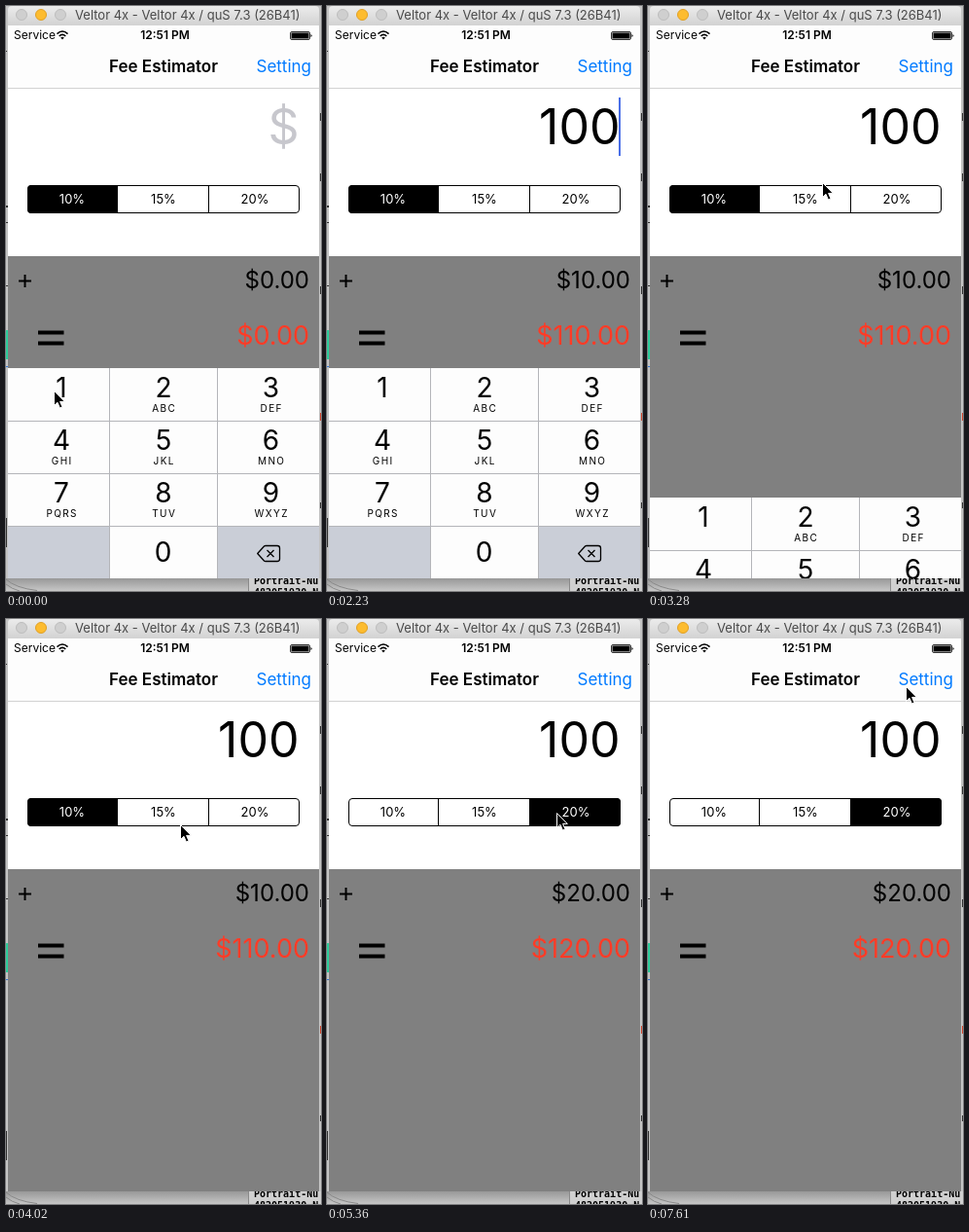
An HTML page that plays this animation: 324 px wide and 601 px high, repeating every 8 s.

```html
<!DOCTYPE html>
<html lang="en">
<head>
<meta charset="utf-8">
<style>
  html, body { margin: 0; width: 100%; height: 100%; overflow: hidden; background: #ccc; }
  svg { display: block; width: 324px; height: 601px; font-family: Inter, Roboto, sans-serif; }
  .end { text-anchor: end; }
  .mid { text-anchor: middle; }
  .mono { font: bold 10px "DejaVu Sans Mono", monospace; }
  .line { fill: none; stroke: #b4b5b9; }
</style>
</head>
<body>
<svg viewBox="0 0 324 601">
  <defs>
    <linearGradient id="bar" x2="0" y2="1">
      <stop stop-color="#ececec"/><stop offset="1" stop-color="#d2d2d2"/>
    </linearGradient>
    <linearGradient id="shade" x2="0" y2="1">
      <stop stop-color="#989898"/><stop offset="1" stop-color="#c6c6c6"/>
    </linearGradient>
    <clipPath id="screen"><path d="M2 20H322V588H2z"/></clipPath>
  </defs>

  <!-- desktop behind the window -->
  <path fill="#c4c4c4" d="M0 0H324V601H0z"/>
  <path fill="url(#shade)" d="M0 588H324V601H0z"/>
  <path fill="#d0d0d0" d="M250 588H324V601H250z"/>
  <path fill="none" stroke="#8a8a8a" d="M249.5 588V601M0 589Q10 598 32 600.5M0 594Q6 599 14 601"/>
  <path fill="#2ecc9b" d="M0 333H2V363H0z"/>
  <path fill="#333" d="M0 46H1V47H0zM0 205H2V207H0zM0 222H2V223H0zM0 287H2V288H0zM0 526H1V556H0zM323 110H324V118H323zM323 172H324V180H323zM323 288H324V296H323zM323 510H324V516H323z"/>
  <path fill="#3478d8" d="M0 370H2V371H0z"/>
  <path fill="#d0442c" d="M323 418H324V426H323z"/>
  <g class="mono">
    <text x="255" y="594">Portrait-Nu</text>
    <text x="255" y="606">482051930-N</text>
  </g>

  <!-- title bar -->
  <path fill="url(#bar)" d="M2 20V4Q2 0 6 0H318Q322 0 322 4V20z"/>
  <g fill="#cfcfcf" stroke="#bdbdbd">
    <circle cx="16" cy="9" r="5.5"/>
    <circle cx="36" cy="9" r="5.5" fill="#fdbc2f" stroke="#e0a025"/>
    <circle cx="56" cy="9" r="5.5"/>
  </g>
  <text x="71" y="14" font-size="13" fill="#4a4a4a">Veltor 4x - Veltor 4x / quS 7.3 (26B41)</text>

  <!-- app -->
  <path fill="#fff" d="M2 20H322V588H2z"/>
  <path fill="#fdfdfd" d="M2 20H322V84H2z"/>
  <path fill="#d2d2d2" d="M2 84H322V85H2z"/>
  <text x="8" y="34" font-size="12">Service</text>
  <path fill="none" stroke="#000" stroke-width="1.6" d="M52.5 28.6Q58 23.4 63.5 28.6M54.7 31Q58 27.8 61.3 31"/>
  <path d="M56.2 32.4Q58 31 59.8 32.4L58 34.4z"/>
  <text class="mid" x="163.5" y="34" font-size="12" font-weight="600">12:51 PM</text>
  <rect x="292.5" y="26.5" width="20" height="8" rx="1.5" fill="none" stroke="#000" stroke-width=".8"/>
  <path d="M293.5 27.5H311.5V33.5H293.5zM313.5 29Q316 30.5 313.5 32z"/>
  <text class="mid" x="162" y="68" font-size="17" font-weight="600">Fee Estimator</text>
  <text class="end" x="314" y="68" font-size="17" fill="#007aff">Setting</text>

  <text id="bill" class="end" x="301.5" y="142" font-size="50"></text>
  <path id="caret" fill="#4a6fe8" d="M300 94H302V154H300z"/>

  <g id="segments" class="mid" font-size="13"></g>
  <rect x="22.5" y="184.5" width="279" height="28" rx="3.5" fill="none" stroke="#000"/>
  <path stroke="#000" d="M114.5 184V213M208.5 184V213"/>

  <path fill="#808080" d="M2 257H322V588H2z"/>
  <path stroke="#000" stroke-width="2" d="M13 282.5H26M19.5 276V289"/>
  <path d="M33 333.5H59.500V337.500H33zM33 344.500H59.500V348.500H33z"/>
  <text id="tip" class="end" x="312" y="290" font-size="24"></text>
  <text id="total" class="end" x="312" y="348" font-size="27" fill="#ff3b26"></text>

  <g clip-path="url(#screen)">
    <g id="pad">
      <path fill="#fdfdfd" d="M2 372H322V588H2z"/>
      <path fill="#caced7" d="M2 534H106V588H2zM218 534H322V588H218z"/>
      <path class="line" d="M106.5 372V588M217.500 372V588M2 426.500H322M2 480.500H322M2 534.500H322"/>
      <g id="keys" class="mid"></g>
      <g fill="none" stroke="#000" stroke-width="1.3" stroke-linejoin="round">
        <path d="M258.700 562.500L265.500 555Q266 554.500 267 554.500H279Q281.500 554.500 281.500 557V568Q281.500 570.500 279 570.500H267Q266 570.500 265.500 570z"/>
        <path d="M268.500 559L275.500 566M275.500 559L268.500 566"/>
      </g>
    </g>
  </g>

  <path id="cursor" stroke="#fff" stroke-linejoin="round" d="M.5 .5V15.500L4 12.300L6.400 18L9 16.900L6.600 11.400H11.300z"/>
</svg>

<script>
const $ = id => document.getElementById(id);
const LOOP = 8000, TICK = 149;

// Cursor stops: tick, x, y
const path = [
  [0, 49, 395], [2, 49, 395], [6, 148, 564], [11, 148, 564], [12, 292, 480],
  [16, 289, 39], [17, 210, 75], [19, 178, 170], [20, 179, 181],
  [24, 179, 181], [27, 179, 211], [31, 179, 211], [35, 236, 199],
  [47, 236, 199], [49, 299, 46], [51, 265, 69]
];
const between = (n, a, b) => n >= a && n < b;

const letters = ["", "ABC", "DEF", "GHI", "JKL", "MNO", "PQRS", "TUV", "WXYZ"];
const columns = [57, 162, 272.5];
const key = (x, y, digit, sub) =>
  `<text x="${x}" y="${y}" font-size="28">${digit}</text>` +
  `<text x="${x + .7}" y="${y + 15}" font-size="10" letter-spacing="1.4">${sub}</text>`;
$("keys").innerHTML = letters.map((sub, i) =>
  key(columns[i % 3], 402 + 54 * Math.floor(i / 3), i + 1, sub)).join("") + key(161.5, 571, 0, "");

const rates = [10, 15, 20];
const shapes = [
  "M115 184H26Q22 184 22 188V209Q22 213 26 213H115z",
  "M114 184H209V213H114z",
  "M208 184H298Q302 184 302 188V209Q302 213 298 213H208z"
];
$("segments").innerHTML = rates.map((rate, i) =>
  `<path d="${shapes[i]}"/><text x="${68 + 94 * i}" y="203">${rate}%</text>`).join("");
const segments = [...$("segments").children];

function place(n) {
  const i = path.findIndex(p => p[0] > n);
  if (i < 0) return path[path.length - 1].slice(1);
  const [t0, x0, y0] = path[i - 1], [t1, x1, y1] = path[i];
  const k = (n - t0) / (t1 - t0);
  return [x0 + (x1 - x0) * k, y0 + (y1 - y0) * k];
}

function show(id, on) {
  $(id).setAttribute("visibility", on ? "visible" : "hidden");
}

function draw(t) {
  const n = Math.floor((t + 10) / TICK);
  const bill = n < 1 ? 0 : n < 7 ? 1 : n < 8 ? 10 : 100;
  const pick = n < 30 ? 0 : n < 35 ? 1 : 2;
  const tip = bill * rates[pick] / 100;

  $("bill").textContent = bill || "$";
  $("bill").setAttribute("fill", bill ? "#000" : "#c7c7cd");
  $("tip").textContent = "$" + tip.toFixed(2);
  $("total").textContent = "$" + (bill + tip).toFixed(2);
  rates.forEach((_, i) => {
    segments[2 * i].setAttribute("fill", i === pick ? "#000" : "#fff");
    segments[2 * i + 1].setAttribute("fill", i === pick ? "#fff" : "#000");
  });

  const slide = 216 * (1 - .384 ** Math.max(0, n - 21) ** 1.6);
  $("pad").setAttribute("transform", `translate(0 ${Math.round(slide)})`);
  show("caret", between(n, 15, 18));
  show("cursor", !between(n, 13, 16) && !between(n, 47, 49));
  $("cursor").setAttribute("transform", `translate(${place(n)})`);
}

const start = performance.now();
function frame() {
  draw((performance.now() - start) % LOOP);
  requestAnimationFrame(frame);
}
frame();
</script>
</body>
</html>
```
